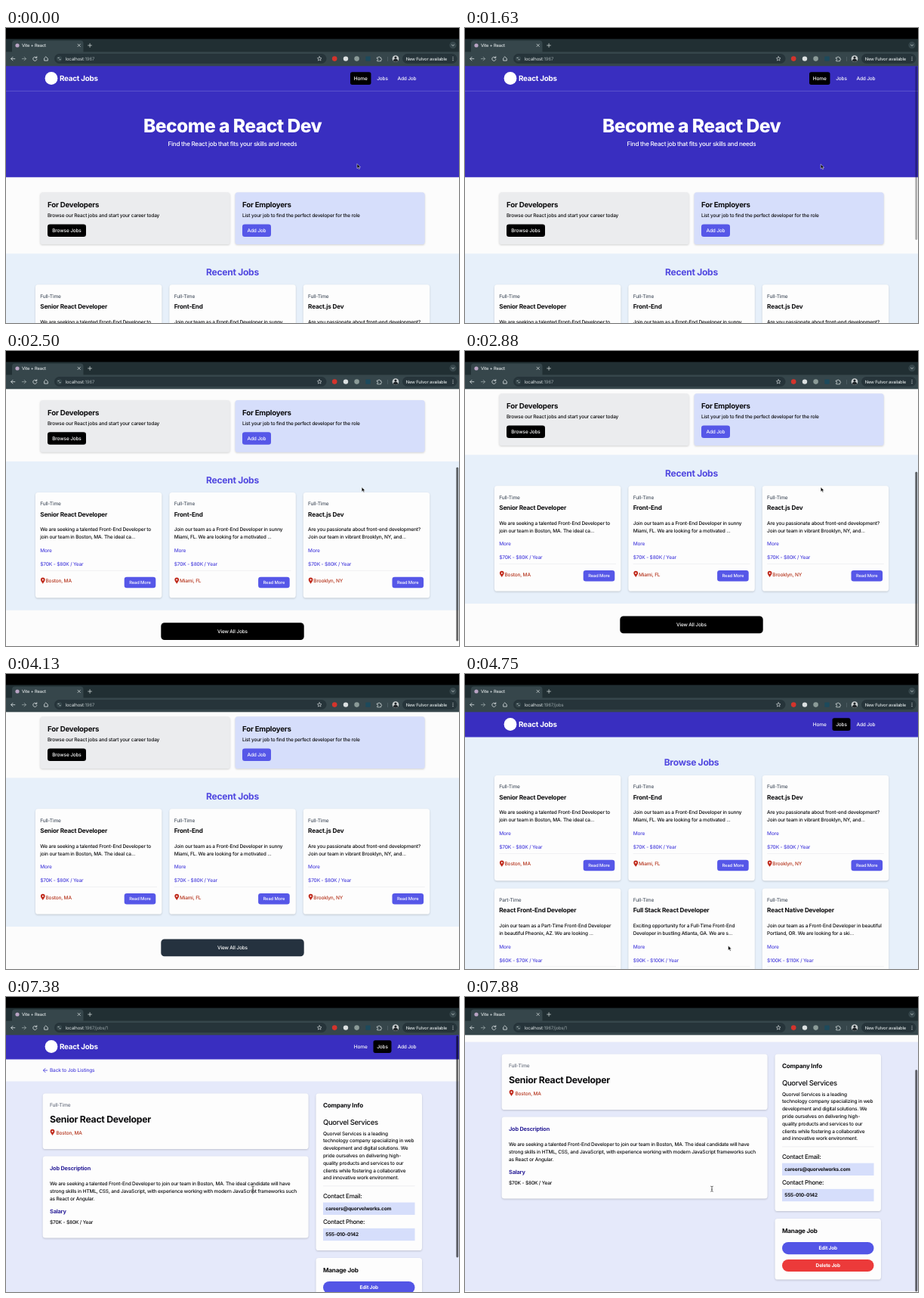
These frames come from a looping animation (600x390 px, 8 s). An HTML page:

```html
<!DOCTYPE html>
<html lang="en">
<head>
<meta charset="utf-8">
<title>Job board demo</title>
<style>
  html, body { margin: 0; width: 100%; height: 100%; overflow: hidden; background: #fcfcfc; }
  svg { display: block; width: 600px; height: 390px; }
  text { font-family: Inter, sans-serif; letter-spacing: -.024em; text-rendering: geometricPrecision; white-space: pre; }
  .large { letter-spacing: -.034em; }
  .card { filter: drop-shadow(0 1px 1px rgba(0, 0, 0, .17)); }
</style>
</head>
<body>
<svg id="stage" viewBox="0 0 600 390"></svg>
<script>
const INDIGO = '#392ec0', BUTTON = '#5657e8', LINK = '#4c43dd', SKY = '#e7f0fa', PAPER = '#fcfcfc', RUST = '#b5341c';
const BODY = 6.53, SMALL = 5.8;

// y is the vertical middle of the capitals
const text = (x, y, s, { size = BODY, fill = '#0c0c0e', weight = 450, mid = false } = {}) =>
  `<text x="${x}" y="${y + size * .36}" font-size="${size}" font-weight="${weight}" fill="${fill}"` +
  `${size > 7 && weight < 700 ? ' class="large"' : ''}${mid ? ' text-anchor="middle"' : ''}>${s}</text>`;
const lines = (x, y, pitch, rows) => rows.map((s, i) => text(x, y + i * pitch, s)).join('');
const rect = (x, y, x2, y2, fill, r = 0, more = '') =>
  `<rect x="${x}" y="${y}" width="${x2 - x}" height="${y2 - y}" rx="${r}" fill="${fill}" ${more}/>`;
const card = (x, y, x2, y2, fill = '#fdfdfd') => rect(x, y, x2, y2, fill, 3.6, 'class="card"');
const dot = (x, y, r, fill) => `<circle cx="${x}" cy="${y}" r="${r}" fill="${fill}"/>`;
const stroke = (d, color, width = .9) =>
  `<path d="${d}" fill="none" stroke="${color}" stroke-width="${width}" stroke-linecap="round" stroke-linejoin="round"/>`;
const button = (x, y, x2, y2, s, fill, { r = 3.3, size = BODY, weight = 450, id = '' } = {}) =>
  rect(x, y, x2, y2, fill, r, id && `id="${id}"`) +
  text((x + x2) / 2, (y + y2) / 2, s, { size, weight, fill: '#fff', mid: true });
const pin = (x, y) =>
  `<path transform="translate(${x} ${y})" fill="#c02a1c" fill-rule="evenodd" d="M0 4.2C-1.6 2-2.9.3-2.9-1.2A2.9 2.9 0 0 1 2.9-1.2C2.9.3 1.6 2 0 4.2ZM0-.1A1 1 0 1 0 0-2.1A1 1 0 1 0 0-.1Z"/>`;

function nav(active) {
  const links = { Home: [456, 483.5], Jobs: [486.5, 510.5], 'Add Job': [513, 549] };
  return rect(0, 50, 600, 83.3, INDIGO) + dot(60, 66.5, 8.4, '#fff') +
    text(71, 66.9, 'React Jobs', { size: 9.8, weight: 700, fill: '#fff' }) +
    Object.entries(links).map(([name, [x, x2]]) =>
      button(x, 58.2, x2, 74.9, name, name === active ? '#000' : 'none', { r: 2.6 })).join('') +
    rect(0, 82.8, 600, 83.3, '#4d45d0');
}

function jobCard(i, y, [type, title, first, second, pay, place], id) {
  const x = 39 + i * 177.4, left = x + 6.3;
  return card(x, y, x + 167.4, y + 139.3) +
    text(left, y + 15, type, { fill: '#4b5563' }) +
    text(left, y + 28.8, title, { size: 8.16, weight: 700 }) +
    lines(left, y + 49, 10, [first, second]) +
    text(left, y + 76.8, 'More', { fill: LINK }) +
    text(left, y + 94.8, pay + ' / Year', { fill: LINK }) +
    rect(left, y + 103, x + 161, y + 103.5, '#e3e4e8') +
    pin(x + 9.8, y + 116.6) + text(x + 13.5, y + 117, place, { fill: RUST }) +
    button(x + 117.7, y + 111.8, x + 159.3, y + 126.3, 'Read More', BUTTON, { size: SMALL, id });
}

const recent = [
  ['Full-Time', 'Senior React Developer', 'We are seeking a talented Front-End Developer to', 'join our team in Boston, MA. The ideal ca...', '$70K - $80K', 'Boston, MA'],
  ['Full-Time', 'Front-End', 'Join our team as a Front-End Developer in sunny', 'Miami, FL. We are looking for a motivated ...', '$70K - $80K', 'Miami, FL'],
  ['Full-Time', 'React.js Dev', 'Are you passionate about front-end development?', 'Join our team in vibrant Brooklyn, NY, and...', '$70K - $80K', 'Brooklyn, NY']
];
const more = [
  ['Part-Time', 'React Front-End Developer', 'Join our team as a Part-Time Front-End Developer', 'in beautiful Pheonix, AZ. We are looking ...', '$60K - $70K', 'Pheonix, AZ'],
  ['Full-Time', 'Full Stack React Developer', 'Exciting opportunity for a Full-Time Front-End', 'Developer in bustling Atlanta, GA. We are s...', '$90K - $100K', 'Atlanta, GA'],
  ['Full-Time', 'React Native Developer', 'Join our team as a Front-End Developer in beautiful', 'Portland, OR. We are looking for a ski...', '$100K - $110K', 'Portland, OR']
];
const row = (jobs, y, id = '') => jobs.map((job, i) => jobCard(i, y, job, i ? '' : id)).join('');
const sectionTitle = (y, s) => text(300, y, s, { size: 12.1, weight: 700, fill: '#5148e0', mid: true });

const home = nav('Home') + rect(0, 83.3, 600, 197.3, INDIGO) +
  text(300, 129, 'Become a React Dev', { size: 24.7, weight: 800, fill: '#fff', mid: true }) +
  text(300, 153, 'Find the React job that fits your skills and needs', { size: 8.1, fill: '#fff', mid: true }) +
  card(45.3, 217.3, 296.7, 286, '#ebecee') + card(303.5, 217.3, 554.7, 286, '#d6defb') +
  text(55, 233.5, 'For Developers', { size: 9.7, weight: 700 }) +
  text(55, 248, 'Browse our React jobs and start your career today') +
  button(55, 259.6, 106, 276, 'Browse Jobs', '#000') +
  text(313, 233.5, 'For Employers', { size: 9.7, weight: 700 }) +
  text(313, 248, 'List your job to find the perfect developer for the role') +
  button(313, 259.6, 351, 276, 'Add Job', BUTTON) +
  rect(0, 298.3, 600, 495, SKY) + sectionTitle(322.5, 'Recent Jobs') + row(recent, 339.2) +
  button(205.3, 511.5, 394.7, 534.3, 'View All Jobs', '#000', { r: 4.6, id: 'viewAll' });

const jobs = rect(0, 50, 600, 390, SKY) + nav('Jobs') + sectionTitle(117, 'Browse Jobs') +
  row(recent, 134, 'readMore') + row(more, 283.6);

const heading = { size: 8.1, weight: 700 }, label = { size: 8 }, strong = { weight: 700 };
const subhead = { size: 7.35, weight: 700, fill: '#2c2299' };
const details = rect(0, 111.5, 600, 441, '#e5e9fa') +
  stroke('M54.6 97H49.6M52 94.4L49.4 97L52 99.6', LINK) + text(58, 97, 'Back to Job Listings', { fill: LINK }) +
  card(48.7, 127.5, 400.6, 201) + text(58, 142.6, 'Full-Time', { fill: '#6b7280' }) +
  text(58, 161.2, 'Senior React Developer', { size: 12.3, weight: 700 }) +
  pin(61.5, 178.8) + text(66.4, 180, 'Boston, MA', { fill: RUST }) +
  card(48.7, 210.5, 400.6, 318.6) + text(58, 226.5, 'Job Description', subhead) +
  lines(58, 247, 9.9, [
    'We are seeking a talented Front-End Developer to join our team in Boston, MA. The ideal candidate will have',
    'strong skills in HTML, CSS, and JavaScript, with experience working with modern JavaScript frameworks such',
    'as React or Angular.']) +
  text(58, 283.5, 'Salary', subhead) + text(58, 297.5, '$70K - $80K / Year') +
  card(410.5, 127.5, 551, 335) + text(420, 143.5, 'Company Info', heading) +
  text(420, 165.6, 'Quorvel Services', { size: 9.5 }) +
  lines(420, 180.3, 9.8, [
    'Quorvel Services is a leading', 'technology company specializing in web', 'development and digital solutions. We',
    'pride ourselves on delivering high-', 'quality products and services to our',
    'clients while fostering a collaborative', 'and innovative work environment.']) +
  rect(420, 249.7, 541.5, 250.2, '#dcdde2') +
  text(420, 263, 'Contact Email:', label) + rect(420, 271.6, 541.5, 288, '#d6defb') +
  text(423.3, 279.8, 'careers@quorvelworks.com', strong) +
  text(420, 297.3, 'Contact Phone:', label) + rect(420, 305.8, 541.5, 322.2, '#d6defb') +
  text(423.3, 314, '555-010-0142', strong) +
  card(410.5, 345, 551, 425.5) + text(420, 360.7, 'Manage Job', heading) +
  button(420, 376, 541.5, 392.2, 'Edit Job', '#5355e6', { r: 8.1, weight: 700 }) +
  button(420, 398.9, 541.5, 415.1, 'Delete Job', '#ec3a3a', { r: 8.1, weight: 700 });
const job = nav('Jobs') + `<g transform="translate(0 1)">${details}</g>`;

const BAR = '#36464b', DEEP = '#26343a', PALE = '#dfe5e6', DIM = '#9aa6a9';
const browser = rect(0, 0, 600, 15, '#000') + rect(0, 14.5, 600, 32, '#212f33') +
  rect(8, 16.5, 102.5, 40, BAR, 4) + rect(0, 31.5, 600, 50.3, BAR) +
  dot(15, 23, 2.6, '#b9a3c4') + text(21, 23, 'Vite + React', { size: SMALL, fill: PALE }) +
  stroke('M95 21.2L98.4 24.6M98.4 21.2L95 24.6M108.7 23H113.5M111.1 20.6V25.4', PALE, .7) +
  dot(592, 22.7, 4.6, BAR) + stroke('M590.4 22.1L592 23.6L593.6 22.1', PALE, .7) +
  stroke('M11.8 40.7H6.8M9 38.4L6.7 40.7L9 43', PALE, .8) +
  stroke('M21.4 40.7H26.4M24.2 38.4L26.5 40.7L24.2 43', DIM, .8) +
  stroke('M40.5 39.3A2.6 2.6 0 1 0 40.9 41.5M40.8 37.7V39.6H38.9M50.7 40.3V43.1H55.3V40.3L53 38.2Z', PALE, .8) +
  rect(64, 34, 424.5, 47, DEEP, 6.5) +
  dot(70.5, 40.6, 3.6, BAR) + stroke('M69 39.5H70.2M71 41.7H72.2', PALE, .7) +
  `<text x="78.6" y="42.6" font-size="6" fill="${PALE}">localhost<tspan id="path" fill="${DIM}"></tspan></text>` +
  stroke('M415.2 37.7L416 39.6L418 39.8L416.5 41.1L417 43.1L415.2 42L413.4 43.1L413.9 41.1L412.4 39.8L414.4 39.6Z', PALE, .6) +
  dot(435.2, 40.6, 3.3, '#d5342c') + dot(450, 40.6, 3.2, '#dbe0e1') + dot(464.6, 40.6, 3.3, '#8b9b98') +
  rect(476.3, 37.4, 482.7, 43.8, '#1d4a5c', 1) +
  stroke('M491.7 39H493.2A1 1 0 0 1 495.2 39H496.6V40.4A1 1 0 0 1 496.6 42.4V43.8H491.7V42.4A1 1 0 0 0 491.7 40.4Z', PALE, .7) +
  rect(505, 38, 505.5, 44, '#62727a') +
  dot(516, 40.6, 4.3, '#cdd2d3') + dot(516, 39.1, 1.6, '#20262a') +
  '<path d="M512.9 43.5A3.1 2.8 0 0 1 519.1 43.5A4.3 4.3 0 0 1 512.9 43.5Z" fill="#20262a"/>' +
  rect(525, 34, 597.5, 47, DEEP, 6.5) + text(529.7, 40.6, 'New Fulvor available', { size: SMALL, fill: PALE }) +
  [-2.1, 0, 2.1].map(d => dot(592, 40.6 + d, .6, PALE)).join('');

const group = (id, inner) => `<g id="${id}">${inner}</g>`;
const pages = { home, jobs, job };
document.getElementById('stage').innerHTML =
  rect(0, 0, 600, 390, PAPER) +
  Object.entries(pages).map(([id, inner]) => group(id, inner)).join('') +
  rect(596.3, 50, 599.2, 50, '#000', 1.4, 'id="thumb"') + browser +
  group('status', rect(-3, 380.8, 54, 393, '#2b363a', 2) + text(1, 385.8, 'localhost:1967/jobs/1', { size: 5.4, fill: '#eef1f1' })) +
  group('arrow', '<path d="M0 0V6.1L1.5 4.8L2.5 7L3.5 6.5L2.5 4.4H4.4Z" fill="#000" stroke="#fff" stroke-width=".5"/>') +
  group('hand', '<path d="M0 0Q.9-.6 1 .5V2.6Q3.8 2.3 3.8 3.7Q3.8 6-.2 6.2Q-1.4 5.6-2 3.6L-.3 4Z" fill="#fff" stroke="#222" stroke-width=".4"/>') +
  group('beam', stroke('M-1.4-.1Q0 0 0 .8Q0 0 1.4-.1M0 .8V6M-1.4 6.9Q0 6.8 0 6Q0 6.8 1.4 6.9M-.6 3.9H.6', '#333', .7));

const el = id => document.getElementById(id);
const show = (id, on) => { el(id).style.display = on ? '' : 'none'; };
const clamp = p => Math.min(1, Math.max(0, p));
const smooth = p => p * p * (3 - 2 * p);
const between = (t, a, b) => t >= a && t < b;

// time, x, y of the pointer
const moves = [[0, 465, 179.5], [950, 465, 179.5], [1450, 471.2, 180], [3000, 471.2, 180], [3800, 350, 360],
  [4700, 350, 360], [5700, 164.3, 247], [6550, 164.3, 247], [7250, 327, 250.3], [8000, 327, 250.3]];
function pointer(t) {
  const i = moves.findIndex(m => m[0] > t), [t0, x0, y0] = moves[i - 1], [t1, x1, y1] = moves[i];
  const p = smooth((t - t0) / (t1 - t0));
  return [x0 + (x1 - x0) * p, y0 + (y1 - y0) * p];
}

function draw() {
  const t = performance.now() % 8000;
  const page = t < 4250 ? 'home' : t < 6400 ? 'jobs' : 'job';
  const range = page === 'job' ? 53 : 161;
  const scroll = page === 'home' ? range * smooth(clamp((t - 1660) / 950) ** 1.25)
    : page === 'job' ? range * smooth(clamp((t - 7340) / 500)) : 0;

  for (const id in pages) show(id, id === page);
  el(page).setAttribute('transform', `translate(0 ${-scroll})`);
  el('path').textContent = ':1967' + { home: '', jobs: '/jobs', job: '/jobs/1' }[page];

  const ratio = 340 / (340 + range), thumb = el('thumb');
  thumb.setAttribute('y', 50.5 + scroll * ratio);
  thumb.setAttribute('height', 340 * ratio - 1);
  thumb.style.opacity = t > 7320 ? .6 : .6 * clamp((t - 1600) / 60) * clamp((3850 - t) / 200);

  el('viewAll').setAttribute('fill', between(t, 3720, 4250) ? '#25323f' : '#000');
  el('readMore').setAttribute('fill', between(t, 5600, 6400) ? '#3f34d6' : BUTTON);
  show('status', between(t, 5820, 6700));

  const [x, y] = pointer(t);
  const shape = between(t, 3900, 4250) ? '' : between(t, 5600, 6400) ? 'hand' : t >= 6400 ? 'beam' : 'arrow';
  for (const id of ['arrow', 'hand', 'beam']) show(id, id === shape);
  if (shape) el(shape).setAttribute('transform', `translate(${x} ${y})`);
  requestAnimationFrame(draw);
}
draw();
</script>
</body>
</html>
```
